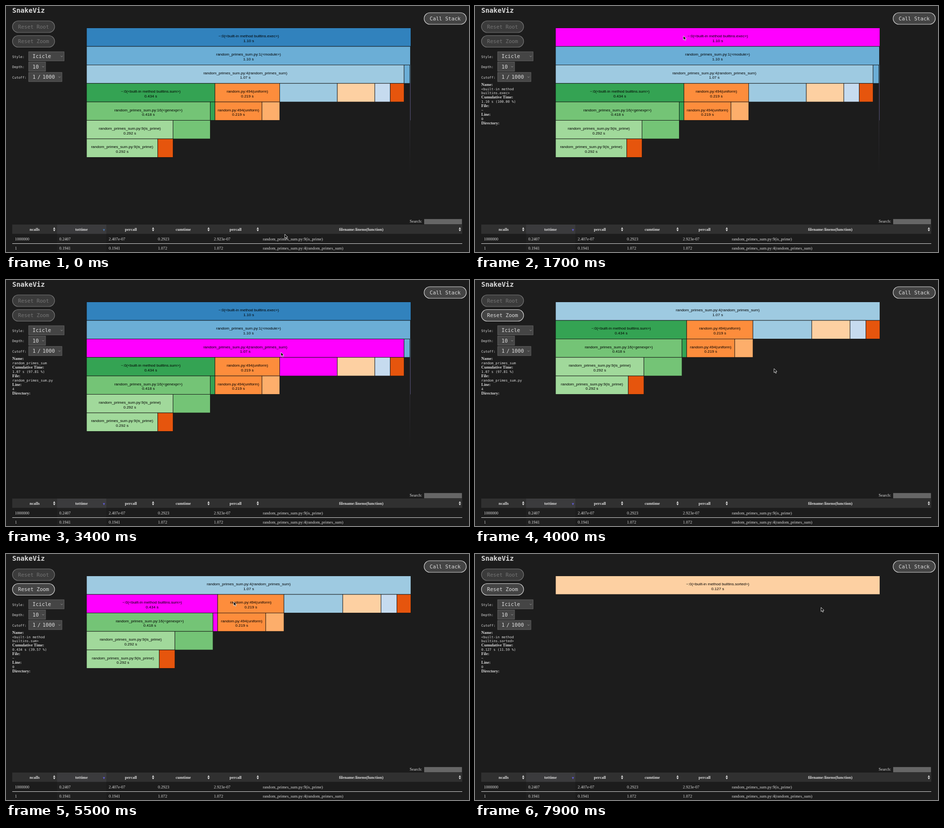
An HTML page for the animation above (8 s loop, 960 by 511 pixels).

```html
<!DOCTYPE html>
<html lang="en">
<head>
<meta charset="utf-8">
<title>Profile viewer</title>
<style>
html, body { margin: 0; width: 100%; height: 100%; overflow: hidden; background: #1c1c1c; }
svg { display: block; width: 960px; height: 511px; }
text { fill: #dcdcdc; white-space: pre; }
.mono { font: 7px "DejaVu Sans Mono", monospace; }
.ctl { font: 10.67px "DejaVu Sans Mono", monospace; }
.title { font: bold 14px "DejaVu Sans Mono", monospace; }
.serif { font: 8.53px "Liberation Serif", serif; }
.bold { font: bold 8.53px "Liberation Serif", serif; }
.bar { font: 8.05px "Liberation Sans", Arial, sans-serif; fill: #000; text-anchor: middle; }
.mid { text-anchor: middle; }
</style>
</head>
<body>
<svg viewBox="0 0 960 511">
  <defs>
    <linearGradient id="fade" x2="0" y2="1">
      <stop stop-color="#37343f"/><stop offset="1" stop-color="#1c1c1c"/>
    </linearGradient>
  </defs>
  <g id="page"></g>
  <g id="chart"></g>
  <g id="side"></g>
  <path id="sort" d="M200.8 463.5h4.6l-2.3 4.5z"/>
  <path id="cursor" d="M0 0V8.4L2 6.6 3.4 9.8 4.8 9.2 3.5 6.1H6.2Z" fill="#000" stroke="#fff" stroke-width=".8"/>
</svg>
<script>
const LOOP = 8000, STEP = 100;
const LEFT = 167, RIGHT = 839.5, TOP = 45.6, ROW = 38.4;
const $ = id => document.getElementById(id);
const esc = s => String(s).replace(/</g, '&lt;');
const text = (x, y, s, cls, extra = '') => `<text x="${x}" y="${y}" class="${cls}" ${extra}>${esc(s)}</text>`;
const rect = (x, y, w, h, fill, extra = '') =>
  `<rect x="${x}" y="${y}" width="${w}" height="${h}" fill="${fill}" ${extra}/>`;

const SCRIPT = 'random_primes_sum.py';
const fn = (color, name, time, pct, file = '~', line = 0, dir = []) => ({ color, name, time, pct, file, line, dir });
const FN = {
  exec: fn('#3182bd', '<built-in method builtins.exec>', '1.10', '100.00'),
  module: fn('#6baed6', '<module>', '1.10', '100.00', SCRIPT, 1),
  main: fn('#9ecae1', 'random_primes_sum', '1.07', '97.81', SCRIPT, 4),
  sum: fn('#34a353', '<built-in method builtins.sum>', '0.434', '39.57'),
  uniform: fn('#fd8d3c', 'uniform', '0.219', '19.97', 'random.py', 494,
    ['/usr/local/lib/', 'python/Frameworks/', 'Versions/3.9/lib/', 'python3.9']),
  sorted: fn('#fdd0a2', '<built-in method builtins.sorted>', '0.127', '11.59'),
  list: fn('#c6dbef', '<listcomp>', '0.052', '4.74', SCRIPT, 5),
  leaf: fn('#e6550d', '<built-in method math.sqrt>', '0.052', '4.74'),
  random: fn('#fdae6b', '<method random>', '0.060', '5.47'),
  gen: fn('#74c476', '<genexpr>', '0.418', '38.12', SCRIPT, 16),
  prime: fn('#a1d99b', 'is_prime', '0.292', '26.65', SCRIPT, 9)
};

// key, depth, left, right (in the unzoomed chart)
const BARS = [
  ['exec', 0, LEFT, RIGHT], ['module', 1, LEFT, 838.6],
  ['main', 2, LEFT, 825.3], ['module', 2, 825.3, 837.3],
  ['sum', 3, LEFT, 433.2], ['uniform', 3, 433.2, 567.6], ['main', 3, 567.6, 687],
  ['sorted', 3, 687, 764.8], ['list', 3, 764.8, 796.8], ['leaf', 3, 796.8, 825.3],
  ['gen', 4, LEFT, 423.6], ['sum', 4, 423.6, 433.2],
  ['uniform', 4, 433.2, 530.8], ['random', 4, 530.8, 567.6],
  ['prime', 5, LEFT, 346.3], ['gen', 5, 346.3, 423.6],
  ['prime', 6, LEFT, 314.7], ['leaf', 6, 314.7, 346.3]
];

function zoom([, depth, left, right]) {
  const k = (RIGHT - LEFT) / (right - left);
  return BARS.filter(b => b[1] >= depth && b[2] >= left && b[3] <= right).map(b => ({
    key: b[0], x: LEFT + (b[2] - left) * k, w: (b[3] - b[2]) * k, y: TOP + (b[1] - depth) * ROW
  }));
}
const VIEWS = [[0, 0], [4000, 2], [7500, 7]].map(([start, i]) => ({ start, bars: zoom(BARS[i]) }));
const viewAt = t => VIEWS.filter(v => t >= v.start).pop();

// time, x, y of the pointer
const PATH = [
  [0, 578, 474], [900, 575, 110], [1600, 436, 66], [1700, 432, 62], [2400, 432, 62],
  [2500, 434, 95], [2600, 437, 128], [2700, 438, 132], [3000, 440, 135], [3400, 570, 150],
  [3600, 570, 150], [3800, 620, 184], [4300, 620, 184], [4500, 590, 70], [4600, 420, 96],
  [4700, 410, 98], [4900, 410, 98], [5000, 400, 72], [5200, 390, 75], [5400, 425, 97],
  [5500, 472, 99], [5700, 500, 100], [5800, 520, 98], [5950, 590, 70], [6100, 645, 100],
  [6500, 645, 100], [6600, 661, 105], [7300, 729, 110], [7700, 729, 110], [7900, 717.5, 111]
];
function pointer(t) {
  const i = PATH.findIndex(p => p[0] > t);
  if (i < 0) return PATH[PATH.length - 1].slice(1);
  if (!i) return PATH[0].slice(1);
  const [a, b] = [PATH[i - 1], PATH[i]], k = (t - a[0]) / (b[0] - a[0]);
  return [a[1] + (b[1] - a[1]) * k, a[2] + (b[2] - a[2]) * k];
}

// hovering reacts one step after the pointer
function hoverAt(t) {
  const [x, y] = pointer(t - STEP);
  const hit = viewAt(t).bars.find(b => x >= b.x && x < b.x + b.w && y >= b.y && y < b.y + ROW);
  return hit && hit.key;
}
function infoAt(t) {
  for (; t > 0; t -= STEP) {
    const key = hoverAt(t);
    if (key) return key;
  }
}

function drawBar({ key, x, y, w }, hover) {
  const f = FN[key], label = `${f.file}:${f.line}(${f.name})`;
  const fill = key === hover ? '#ff00ff' : f.color;
  let out = rect(x, y, w, ROW, fill, 'stroke="#111" stroke-width=".8"');
  if (w > 90 && !(key === 'main' && w < 200)) {
    out += text(x + w / 2, y + 19.3, label, 'bar') + text(x + w / 2, y + 29, f.time + ' s', 'bar');
  }
  return out;
}

function drawInfo(key) {
  if (!key) return '';
  const f = FN[key];
  const name = f.name.startsWith('<built-in') ? ['<built-in method', f.name.split(' ').pop()] : [f.name];
  let y = 166.4, out = '';
  for (const [head, lines] of [['Name:', name], ['Cumulative Time:', [`${f.time} s (${f.pct} %)`]],
    ['File:', [f.file]], ['Line:', [f.line]], ['Directory:', f.dir]]) {
    out += text(13, y, head, 'bold');
    y += 8.7;
    lines.forEach((s, i) => out += text(13, y + 8 * i, s, 'mono'));
    y += 8 * lines.length + 1.3;
  }
  return out;
}

function button(x, y, label, on) {
  return rect(x, y, 87.4, 24, on ? '#444' : '#3b3b3b',
    `rx="12" stroke="${on ? '#d6d6d6' : '#777'}" stroke-width="1.2"`) +
    text(x + 43.7, y + 15.9, label, 'ctl mid', on ? '' : 'style="fill:#747474"');
}

function select(y, w, label, value) {
  const x = 47 + w - 5;
  return text(13, y + 12.8, label, 'mono') +
    rect(47, y, w, 19, '#454545', 'stroke="#6c6c6c" stroke-width=".8"') +
    text(55, y + 13.4, value, 'ctl') +
    `<path d="M${x - 2} ${y + 8.6}l2 2 2-2" fill="none" stroke="#aaa" stroke-width=".8"/>`;
}

function drawPage() {
  const cols = [['ncalls', 59.5, 100, 18.5], ['tottime', 156.5, 0, 110.5], ['percall', 259, 305, 213],
    ['cumtime', 367.5, 420, 315], ['percall', 476, 522, 431], ['filename:lineno(function)', 736.5, 941, 532.5]];
  const rows = [
    ['1000000', '0.2407', '2.407e-07', '0.2923', '2.923e-07', SCRIPT + ':9(is_prime)'],
    ['1', '0.1941', '0.1941', '1.072', '1.072', SCRIPT + ':4(random_primes_sum)']];
  let out = text(13, 14.4, 'SnakeViz', 'title') + button(867, 14, 'Call Stack', true) +
    button(13.4, 31, 'Reset Root', false) +
    select(95, 73.5, 'Style:', 'Icicle') + select(116.5, 35, 'Depth:', '10') + select(138, 69, 'Cutoff:', '1') +
    text(65.3, 151.4, '/', 'ctl') + text(75.7, 151.4, '1000', 'ctl') +
    text(837, 449.8, 'Search:', 'serif') +
    rect(867.5, 443, 77.5, 10, '#666', 'stroke="#777" stroke-width=".6"') +
    rect(13, 454, 933, 19.3, '#303030') + rect(106, 454, 102, 19.3, '#3b3b3d') +
    rect(106, 474, 102, 37, '#202020') + rect(13, 493, 933, 1, '#d0d0d0');
  cols.forEach(([head, mid, arrow, x], i) => {
    out += text(mid, 466.6, head, 'bold mid');
    if (arrow) out += `<path d="M${arrow - 2.3} 463.2l2.3-3.7 2.3 3.7zm0 1.4h4.6l-2.3 3.7z" fill="#ddd"/>`;
    rows.forEach((r, j) => out += text(x, 486.5 + 19.2 * j, r[i], 'serif'));
  });
  return out;
}

function draw(t) {
  const view = viewAt(t), hover = hoverAt(t), zoomed = view !== VIEWS[0];
  const edge = zoomed ? '' : rect(838, TOP + 2 * ROW, 1, ROW, '#52758a') +
    rect(837.8, TOP + 3 * ROW, 1, 2 * ROW, '#5b5680') + rect(837, TOP + 5 * ROW, .8, 3 * ROW, 'url(#fade)');
  $('chart').innerHTML = view.bars.map(b => drawBar(b, hover)).join('') + edge;
  $('side').innerHTML = button(13.4, 61.5, 'Reset Zoom', zoomed) + drawInfo(infoAt(t));
  $('sort').setAttribute('fill', t < 1000 ? '#4c78ac' : '#615bd0');
  $('cursor').setAttribute('transform', `translate(${pointer(t)})`);
}

$('page').innerHTML = drawPage();
let last = -1;
const begin = performance.now();
function tick() {
  const t = Math.floor(Math.max(0, performance.now() - begin) % LOOP / STEP) * STEP;
  if (t !== last) draw(last = t);
  requestAnimationFrame(tick);
}
tick();
</script>
</body>
</html>
```
